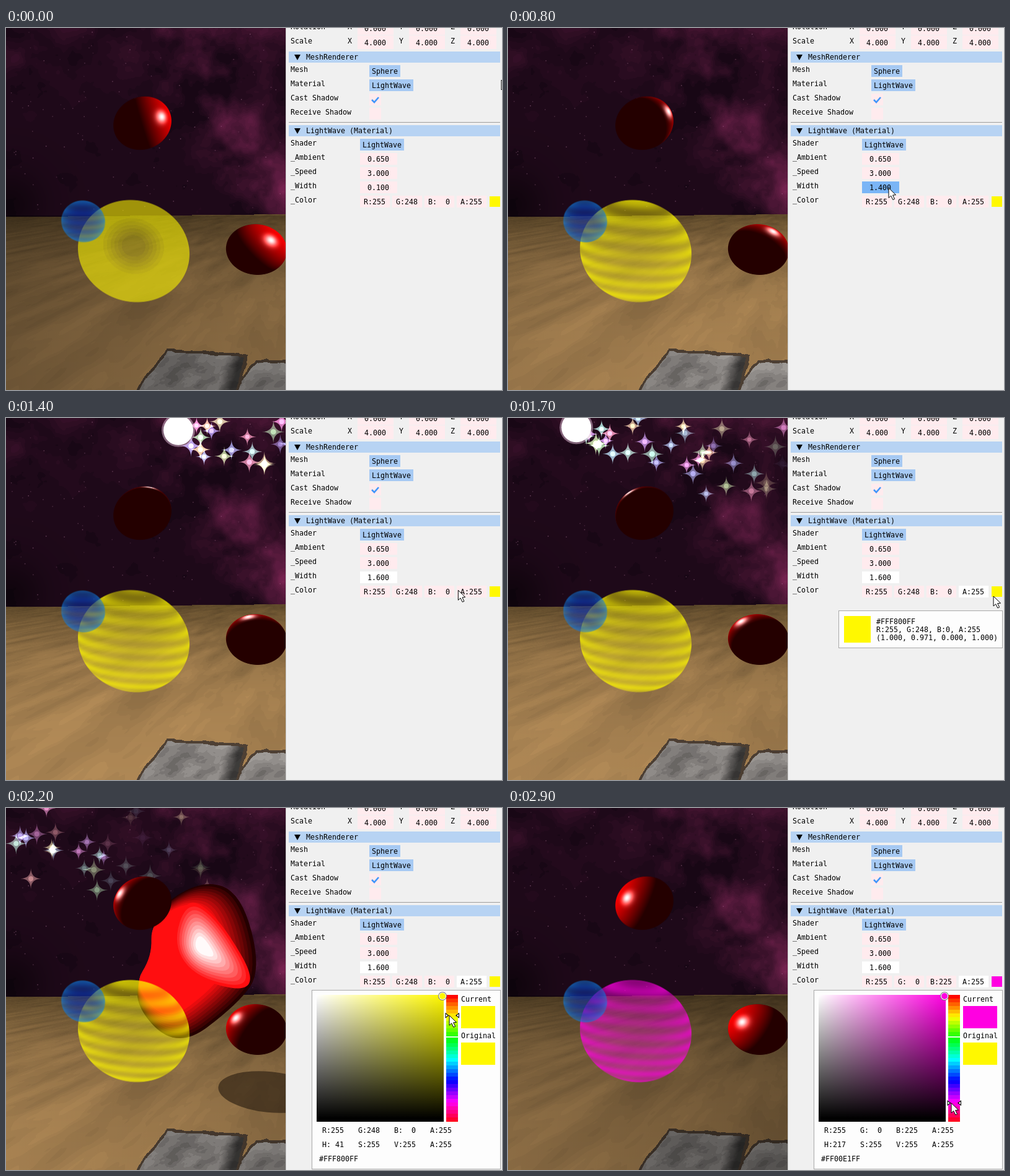
An HTML page with a canvas for the animation above (3 s loop, 800 by 585 pixels).

```html
<!DOCTYPE html>
<html>
<head>
<meta charset="utf-8">
<style>
html, body { margin: 0; width: 100%; height: 100%; overflow: hidden; background: #f0f0f0; }
canvas { display: block; }
</style>
</head>
<body>
<canvas id="stage" width="800" height="585"></canvas>
<script>
const ctx = document.getElementById('stage').getContext('2d');
const VIEW_W = 451, H = 585, HORIZON = 303, LOOP = 3000, STEP = 100;

const clamp = (v, lo = 0, hi = 1) => Math.min(hi, Math.max(lo, v));
const lerp = (a, b, k) => a + (b - a) * k;
const mix = (a, b, k) => a.map((v, i) => lerp(v, b[i], k));
const span = (t, from, to) => clamp((t - from) / (to - from));
const bell = (d, w) => Math.exp(-d * d / (w * w));
const rgb = c => `rgb(${c.map(Math.round).join()})`;

function hash(x, y) {
  let h = Math.imul(x, 374761393) + Math.imul(y, 668265263) | 0;
  h = Math.imul(h ^ (h >>> 13), 1274126177);
  return ((h ^ (h >>> 16)) >>> 0) / 4294967296;
}
function noise(x, y) {
  const ix = Math.floor(x), iy = Math.floor(y);
  let fx = x - ix, fy = y - iy;
  fx *= fx * (3 - 2 * fx);
  fy *= fy * (3 - 2 * fy);
  return lerp(lerp(hash(ix, iy), hash(ix + 1, iy), fx),
              lerp(hash(ix, iy + 1), hash(ix + 1, iy + 1), fx), fy);
}
function fbm(x, y) {
  let sum = 0, amp = 0.5;
  for (let i = 0; i < 4; i++, amp /= 2, x *= 2.1, y *= 2.1) sum += amp * noise(x, y);
  return sum / 0.94;
}

function pixels(w, h, shade) {
  const c = document.createElement('canvas');
  c.width = w;
  c.height = h;
  const g = c.getContext('2d'), img = g.createImageData(w, h);
  for (let y = 0, i = 0; y < h; y++)
    for (let x = 0; x < w; x++, i += 4) {
      const p = shade(x, y);
      if (p) { img.data.set(p.map(Math.round), i); if (p.length < 4) img.data[i + 3] = 255; }
    }
  g.putImageData(img, 0, 0);
  return c;
}

function disc(x, y, r, fill) {
  ctx.beginPath();
  ctx.arc(x, y, r, 0, 7);
  ctx.fillStyle = fill;
  ctx.fill();
}
function poly(pts, fill) {
  ctx.beginPath();
  pts.forEach(([x, y]) => ctx.lineTo(x, y));
  ctx.closePath();
  ctx.fillStyle = fill;
  ctx.fill();
}

function makeSky() {
  const sky = pixels(VIEW_W, 306, (x, y) => {
    const diagonal = x - y - 190;
    const mask = bell(diagonal, 105) * clamp((x - 220) / 130) + 0.5 * bell(y - 15, 70) * clamp(x / 260)
      + 0.4 * bell(Math.hypot(x - 30, y - 50), 60);
    const n = fbm(x / 50 + 4, y / 50);
    const k = mask * clamp((n - 0.28) * 1.6) + 0.1 * n;
    const dark = 1 - 0.45 * bell(Math.hypot(x - 5, y - 285), 55);
    return mix([24, 7, 21], [115, 34, 78], Math.round(k * 16) / 16).map(c => c * dark);
  });
  const g = sky.getContext('2d');
  for (let i = 0; i < 110; i++) {
    g.fillStyle = `rgba(190,130,165,${0.12 + 0.35 * hash(i, 7)})`;
    g.fillRect(hash(i, 1) * VIEW_W, hash(i, 2) * 295, 1.5, 1.5);
  }
  return sky;
}

// Grey stone with a sloped left flank and a shaded right flank; null outside
function rockColor(x, y, left, right, top) {
  const down = y - top, rough = 7 * (fbm(x / 14, y / 14) - 0.5);
  const rightGap = right - 0.3 * down - x;
  const depth = Math.min(x - left + 0.77 * down, down - 0.06 * (x - left), rightGap + 8) + rough;
  if (depth < -5) return null;
  if (depth < 0) return [78, 64, 52];
  const facet = Math.round(fbm(x / 30 + y / 40, y / 22) * 7) / 7;
  const v = (95 + 90 * facet) * (0.42 + 0.58 * clamp((rightGap + rough) / 22));
  return [v, v * 0.97, v * 0.95];
}

function makeGround() {
  return pixels(VIEW_W, H - 300, (x, row) => {
    const y = row + 300, v = row - 5 + x / 100;
    if (v < 0) return null;
    const rock = rockColor(x, y, 260, 380, 523) || rockColor(x, y, 404, 490, 540);
    if (rock) return rock;
    const u = (x - 225) / (v + 40), d = 40 / (v + 40);
    const n = fbm(u * 1.5 + d * 5 + 9, d * 30 - u * 4 + 30);
    const shade = 1 + Math.round((n - 0.5) * 9) / 9 * 0.3;
    return mix([94, 73, 42], [170, 132, 83], 1 - Math.exp(-v / 75)).map(c => c * shade);
  });
}

const sky = makeSky(), ground = makeGround();

// The lamp circles the scene at a constant rate, passing behind it halfway through.
// Space is in pixels at the front ball's depth: y up from the horizon, z toward the viewer.
const orbitAngle = t => Math.PI + (t - 1400) * 0.0011;
function lampAt(t) {
  const a = orbitAngle(t);
  return [278 + 700 * Math.sin(a), 389, 50 + 700 * Math.cos(a)];
}
function project([x, y, z]) {
  const p = 1740 / (1740 - z);
  return [278 + (x - 278) * p, HORIZON - y * p];
}

// Draws a shaded ball; the shader gets the unit normal with y pointing up
function drawBall({ x, y, a, b, rot }, shade) {
  const r = Math.ceil(a) + 2, cos = Math.cos(rot), sin = Math.sin(rot);
  const img = pixels(2 * r, 2 * r, (px, py) => {
    const dx = px + 0.5 - r, dy = py + 0.5 - r;
    const u = (dx * cos + dy * sin) / a, v = (dy * cos - dx * sin) / b;
    const rr = Math.hypot(u, v), edge = clamp((1 - rr) * a + 0.5);
    if (!edge) return null;
    const c = shade(u * cos - v * sin, -(u * sin + v * cos), Math.sqrt(Math.max(0, 1 - rr * rr)), rr);
    c[3] *= 255 * edge;
    return c;
  });
  ctx.drawImage(img, x - r, y - r);
}

const unit = v => v.map(c => c / Math.hypot(...v));
const dot = (a, b) => a[0] * b[0] + a[1] * b[1] + a[2] * b[2];

function redBall(shape, lamp) {
  const l = unit([lamp[0] - shape.x, lamp[1] - (HORIZON - shape.y), lamp[2] - shape.z]);
  const half = unit([l[0], l[1], l[2] + 1]);
  drawBall(shape, (...n) => {
    const diffuse = Math.max(0, dot(n, l));
    const spec = 255 * Math.pow(Math.max(0, dot(n, half)), 40) * clamp(diffuse * 5);
    return [Math.min(255, 36 + 212 * diffuse + spec), spec, spec, 1];
  });
}

function waveBall(shape, color, width, t) {
  const bands = span(width, 0.1, 1);
  drawBall(shape, (x, y, z, r) => {
    const core = clamp(1.45 - Math.hypot(x, y - 0.1) / 0.4);
    const flat = 0.58 - 0.28 * Math.round(core * 6) / 6;
    const wave = 0.5 + 0.5 * Math.sin(14.5 * width * (-y - 0.22 * z - 0.05 * x) - 3 * t / 1000);
    const banded = 0.3 + wave * (0.14 + 0.14 * r) + 0.18 * r * r;
    return [...color, lerp(flat, banded, bands)];
  });
}

function blueBall(t) {
  drawBall({ x: 124.5, y: 312.5, a: 35.5, b: 33.5, rot: 0.3 }, (x, y, z, r) => {
    const wave = Math.sin(14 * (y + 0.2 * z) + 3 * t / 1000);
    return [...mix([8, 50, 180], [16, 125, 225], r * r * r), 0.58 + 0.07 * wave];
  });
}

const BALL_A = { x: 220, y: 153.7, z: 0, a: 47.6, b: 42.3, rot: -0.4 };
const BALL_B = { x: 404, y: 358, z: -150, a: 49.2, b: 40.8, rot: 0.1 };
const BIG = { x: 206, y: 360.5, a: 90.7, b: 81.7, rot: 0.3 };

function sparkle(x, y, r, color, alpha) {
  ctx.globalAlpha = alpha;
  ctx.fillStyle = color;
  ctx.beginPath();
  ctx.moveTo(x, y - r);
  for (const [dx, dy] of [[r, 0], [0, r], [-r, 0], [0, -r]])
    ctx.quadraticCurveTo(x + dx * 0.05, y + dy * 0.05, x + dx, y + dy);
  ctx.fill();
  ctx.globalAlpha = alpha * 0.6;
  disc(x, y, r * 0.24, color);
}

function drawTrail(t) {
  ctx.save();
  ctx.globalCompositeOperation = 'lighter';
  for (let i = 0; i < 50; i++) {
    const birth = 1040 + i * 17, age = t - birth, rnd = k => hash(i + 20, k + 3);
    const life = 650 + 450 * rnd(1);
    if (age < 0 || age > life) continue;
    const [x, y] = project(lampAt(birth));
    sparkle(x + 50 * (rnd(2) - 0.5), y + 50 * (rnd(3) - 0.4) + age * 0.2 * rnd(4),
      13 + 6 * rnd(5), `hsl(${360 * rnd(6)},32%,64%)`, clamp(1.1 * (1 - age / life)));
  }
  ctx.restore();
  const [x, y] = project(lampAt(t));
  disc(x, y, 27, 'rgba(225,190,215,.5)');
  disc(x, y, 24, '#fff');
}

// Closed smooth outline, scaled about an anchor
function smoothPath(pts, k, ax, ay) {
  const p = pts.map(([x, y]) => [ax + (x - ax) * k, ay + (y - ay) * k]);
  const mid = (a, b) => mix(a, b, 0.5);
  ctx.beginPath();
  ctx.moveTo(...mid(p[p.length - 1], p[0]));
  p.forEach((c, i) => ctx.quadraticCurveTo(...c, ...mid(c, p[(i + 1) % p.length])));
}

const BLOB = [[318, 115], [380, 138], [412, 262], [375, 316], [275, 392], [198, 308], [241, 240], [238, 165]];
const GLINT = [[296, 160], [338, 188], [392, 282], [310, 268], [276, 222]];

function drawBlob(t) {
  if (t < 1900 || t > 2500) return;
  ctx.save();
  ctx.translate(2200 - t, 0);
  ctx.fillStyle = 'rgba(38,26,14,.6)';
  ctx.beginPath();
  ctx.ellipse(425, 459, 83, 33, 0.1, 0, 7);
  ctx.fill();
  const rings = 9;
  for (let i = 0; i <= rings; i++) {
    smoothPath(BLOB, 1 - 0.032 * i, 222, 238);
    ctx.fillStyle = rgb(mix([36, 0, 0], [255, 14, 16], i / rings));
    ctx.fill();
  }
  for (let i = 0; i <= rings; i++) {
    smoothPath(GLINT, 1.3 - 0.11 * i, 316, 224);
    ctx.fillStyle = rgb(mix([255, 14, 16], [255, 250, 250], i / rings));
    ctx.fill();
  }
  ctx.restore();
}

function lightGround(t) {
  const a = orbitAngle(t), level = 0.72 + 0.28 * Math.max(0, -Math.cos(a)), tilt = 0.09 * Math.sin(a);
  const g = ctx.createLinearGradient(0, 0, VIEW_W, 0);
  [level - tilt, level + tilt].forEach((v, i) => g.addColorStop(i, rgb([255 * v, 255 * v, 255 * v])));
  ctx.globalCompositeOperation = 'multiply';
  ctx.fillStyle = g;
  ctx.fillRect(0, HORIZON, VIEW_W, H - HORIZON);
  ctx.globalCompositeOperation = 'source-over';
}

function drawScene(t, color, width) {
  ctx.save();
  ctx.beginPath();
  ctx.rect(0, 0, VIEW_W, H);
  ctx.clip();
  ctx.drawImage(sky, 0, 0);
  ctx.drawImage(ground, 0, 300);
  lightGround(t);
  drawTrail(t);
  drawBlob(t);
  redBall(BALL_A, lampAt(t));
  redBall(BALL_B, lampAt(t));
  waveBall(BIG, color, width, t);
  blueBall(t);
  ctx.restore();
}

const PINK = '#ffebee', BUTTON = '#a6c9f3', HEADER = '#b7d3f3', YELLOW = '#fff800';
const BAR_TOP = 302, BAR_H = 205;

function box(x, y, w, h, fill) {
  ctx.fillStyle = fill;
  ctx.fillRect(x, y, w, h);
}
function text(s, x, baseline) {
  ctx.fillStyle = '#000';
  ctx.fillText(s, x, baseline);
}
function boxed(s, x, y, w, fill, pad) {
  box(x, y, w, 19, fill);
  text(s, x + pad, y + 14);
}
const button = (s, x, y) => boxed(s, x, y, s.length * 7 + 8, BUTTON, 4);
function header(s, y) {
  box(456, y, 341, 18, HEADER);
  poly([[465, y + 5], [475, y + 5], [470, y + 14]], '#000');
  text(s, 484, y + 13);
}
function framed(x, y, w, h) {
  box(x, y, w, h, '#fdfdfd');
  ctx.strokeStyle = '#a8a8a8';
  ctx.lineWidth = 1;
  ctx.strokeRect(x + 0.5, y + 0.5, w - 1, h - 1);
}
const pad3 = v => String(v).padStart(3);
const channels = c => c.map((v, i) => 'RGB'[i] + ':' + pad3(v)).concat('A:255');
const hex = c => '#' + c.map(v => v.toString(16).padStart(2, '0')).join('').toUpperCase() + 'FF';
const hueColor = h => [0, 240, 120].map(o =>
  Math.round(255 * clamp(Math.abs((h + o) % 360 - 180) / 60 - 1)));

function drawPanel(t, color, width) {
  box(VIEW_W, 0, 800 - VIEW_W, H, '#f0f0f0');
  box(VIEW_W, 0, 1, H, '#c4c4c4');
  [['Rotation', -11, '0.000'], ['Scale', 12, '4.000']].forEach(([label, y, value]) => {
    text(label, 459, y + 13);
    ['X', 'Y', 'Z'].forEach((axis, i) => {
      text(axis, 551 + 83 * i, y + 13);
      box(567 + 83 * i, y, 58, 22, PINK);
      text(value, 578 + 83 * i, y + 16);
    });
  });
  header('MeshRenderer', 38);
  ['Mesh', 'Material', 'Cast Shadow', 'Receive Shadow'].forEach((s, i) => text(s, 459, 71 + 23 * i));
  button('Sphere', 586, 60);
  button('LightWave', 586, 83);
  box(586, 106, 19, 19, PINK);
  box(586, 129, 19, 19, PINK);
  ctx.strokeStyle = '#4296fa';
  ctx.lineWidth = 2.6;
  ctx.beginPath();
  ctx.moveTo(590, 116);
  ctx.lineTo(594, 120);
  ctx.lineTo(601, 112);
  ctx.stroke();
  box(456, 152, 341, 1, '#9c9c9c');

  header('LightWave (Material)', 157);
  ['Shader', '_Ambient', '_Speed', '_Width', '_Color'].forEach((s, i) => text(s, 459, 190 + 23 * i));
  button('LightWave', 571, 179);
  const widthFill = t < 400 ? PINK : t < 1000 ? '#7ab5f6' : '#fff';
  [['0.650', PINK], ['3.000', PINK], [width.toFixed(3), widthFill]]
    .forEach(([s, fill], i) => boxed(s, 571, 202 + 23 * i, 60, fill, 12));
  channels(color).forEach((s, i) =>
    boxed(s, 571 + 52 * i, 271, 48, i === 3 && t >= 1500 ? '#fff' : PINK, 6));
  box(780, 272, 17, 17, rgb(color));
}

function drawTooltip() {
  framed(533, 311, 265, 61);
  box(542, 320, 43, 43, YELLOW);
  ['#FFF800FF', 'R:255, G:248, B:0, A:255', '(1.000, 0.971, 0.000, 1.000)']
    .forEach((s, i) => text(s, 594, 333 + 13 * i));
}

const barY = hue => BAR_TOP + hue / 360 * BAR_H;

function drawPicker(hue) {
  const color = hueColor(hue), fill = rgb(color);
  framed(493, 294, 305, 290);
  const fade = (dx, dy, from, to) => {
    const g = ctx.createLinearGradient(501, BAR_TOP, 501 + dx, BAR_TOP + dy);
    g.addColorStop(0, from);
    g.addColorStop(1, to);
    box(501, BAR_TOP, 205, BAR_H, g);
  };
  fade(205, 0, '#fff', fill);
  fade(0, 200, 'rgba(0,0,0,0)', '#000');
  for (let y = 0; y < BAR_H; y += 6)
    box(710, BAR_TOP + y, 19, Math.min(6, BAR_H - y), rgb(hueColor((y + 1) / BAR_H * 360)));
  box(710, 369, 19, 2, '#e4ffe0');
  const y = barY(hue);
  for (const [x, dir] of [[708.5, 1], [731, -1]]) {
    poly([[x, y - 4.5], [x + 6 * dir, y], [x, y + 4.5]], '#000');
    poly([[x + dir, y - 2.5], [x + 4 * dir, y], [x + dir, y + 2.5]], '#fff');
  }
  [['#777', 7], ['#fff', 6], [fill, 5]].forEach(([c, r]) => disc(704, 304, r, c));
  text('Current', 734, 313);
  box(734, 320, 55, 36, fill);
  text('Original', 734, 372);
  box(734, 379, 55, 36, YELLOW);
  const hsv = ['H:' + pad3(Math.floor(hue / 360 * 255)), 'S:255', 'V:255', 'A:255'];
  [channels(color), hsv].forEach((row, j) =>
    row.forEach((s, i) => text(s, 510 + 58 * i, 525 + 23 * j)));
  text(hex(color), 505, 571);
}

// Color stays put, then slides along the hue bar
const hueAt = t => lerp(58.35, 307.06, span(t, 2300, 2736));
const widthAt = t => Math.round(16 - 15 * Math.pow(1 - span(t, 500, 900), 1.5)) / 10;

// Visits the width field, drags it, hovers the swatch, then follows the hue
function cursorAt(t) {
  const field = [590, 257], dragged = [622, 259], swatch = [783, 288];
  if (t < 500) return mix([799, 84], field, t / 500);
  if (t < 900) return mix(field, dragged, span(t, 500, 900));
  if (t < 1900) return mix(dragged, swatch, span(t, 900, 1650));
  return mix(swatch, [715, barY(hueAt(t))], span(t, 1900, 2200));
}

function drawCursor([x, y]) {
  const shape = [[0, 0], [0, 16], [3.7, 12.6], [6.8, 19], [9.6, 17.8], [6.6, 11.6], [11.5, 11.2]];
  poly(shape.map(([dx, dy]) => [x + dx, y + dy]), '#fff');
  ctx.strokeStyle = '#000';
  ctx.lineWidth = 1;
  ctx.stroke();
}

function draw(t) {
  // The panel trails the picker by a moment while dragging
  const color = hueColor(hueAt(t - 6.2)), width = widthAt(t);
  ctx.font = '11.63px "DejaVu Sans Mono", monospace';
  drawScene(t, color, width);
  drawPanel(t, color, width);
  if (t >= 1600 && t < 2000) drawTooltip();
  if (t >= 2000) drawPicker(hueAt(t));
  drawCursor(cursorAt(t));
}

let shown = -1;
function tick() {
  const t = Math.floor(performance.now() % LOOP / STEP) * STEP;
  if (t !== shown) draw(shown = t);
  requestAnimationFrame(tick);
}
tick();
</script>
</body>
</html>
```
